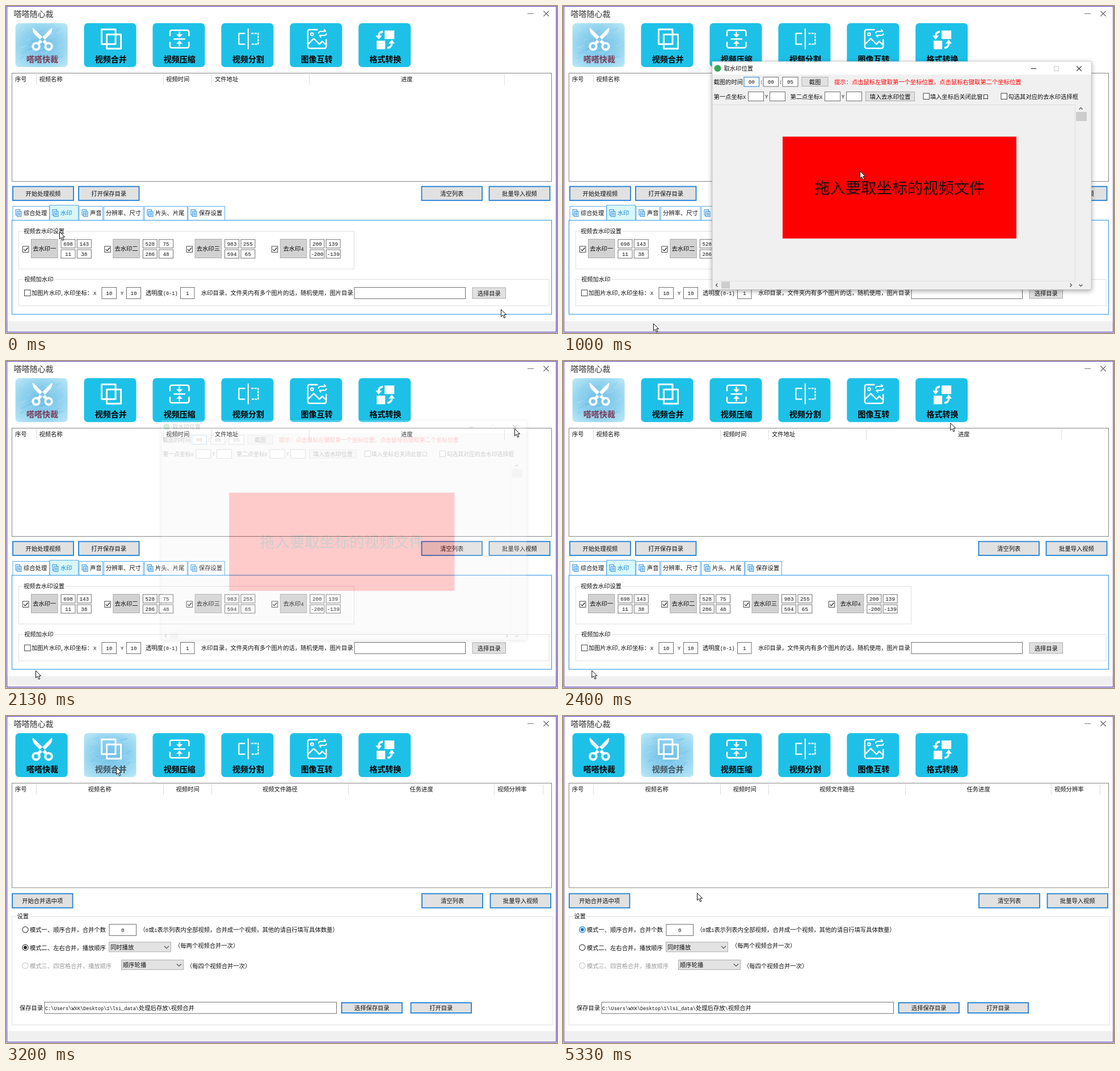
Write an HTML page that moves like this. It is 971 px wide and 577 px high and loops after 5.39 s.

```html
<!DOCTYPE html>
<html lang="zh-CN">
<head>
<meta charset="utf-8">
<title>视频工具</title>
<style>
html, body { margin: 0; width: 100%; height: 100%; overflow: hidden; background: #fff; }
svg { display: block; width: 971px; height: 577px; }
text { font: 10.3px "Noto Sans CJK SC", "Noto Sans CJK JP", "Noto Sans CJK", sans-serif; fill: #111; }
.a { font-family: "Liberation Mono", monospace; font-size: 8.6px; }
.num .a { font-size: 9.3px; }
.thin { font-weight: 300; }
.w { fill: none; stroke: #fff; stroke-width: 3; stroke-linejoin: round; }
.f { fill: #fff; stroke: none; }
</style>
</head>
<body>
<svg id="stage" viewBox="0 0 971 577" xmlns="http://www.w3.org/2000/svg"></svg>
<script>
const LOOP = 5390, STEP = 200 / 3;
const SWITCH = 3060, PICK = 4900;
const APP = '嗒嗒随心裁';
const TILES = ['嗒嗒快裁', '视频合并', '视频压缩', '视频分割', '图像互转', '格式转换'];
const GREY = '#d2d2d2', GREY_EDGE = '#adadad', BLUE_EDGE = '#1f80d4';

// ---- drawing helpers ----
const text = (x, y, s, o = {}) => {
  const runs = s.replace(/[\x21-\x7e]+/g, m => `<tspan class="a">${m}</tspan>`);
  const style = [o.size && `font-size:${o.size}px`, o.bold && 'font-weight:700', o.fill && `fill:${o.fill}`]
    .filter(Boolean).join(';');
  return `<text x="${x}" y="${y}" class="${o.cls || ''}" text-anchor="${o.mid ? 'middle' : 'start'}" style="${style}">${runs}</text>`;
};
// Rectangle from corner to corner
const box = (x1, y1, x2, y2, fill = 'none', stroke = 'none', w = 1, extra = '') =>
  `<rect x="${x1}" y="${y1}" width="${x2 - x1}" height="${y2 - y1}" fill="${fill}" stroke="${stroke}" stroke-width="${w}" ${extra}/>`;
const path = (d, stroke = '#333', w = 1, fill = 'none') =>
  `<path d="${d}" fill="${fill}" stroke="${stroke}" stroke-width="${w}"/>`;
const cross = (x, y, r, c, w = 1, extra = '') =>
  `<path d="M${x - r} ${y - r}l${2 * r} ${2 * r}m0 ${-2 * r}l${-2 * r} ${2 * r}" fill="none" stroke="${c}" stroke-width="${w}" ${extra}/>`;

const blueButton = (x1, y1, x2, y2, s) =>
  box(x1 + 1, y1 + 1, x2 - 1, y2 - 1, '#e1e1e1', BLUE_EDGE, 1.8) +
  text((x1 + x2) / 2, (y1 + y2) / 2 + 4, s, { mid: 1 });
const button = (x1, y1, x2, y2, s, fill = '#e1e1e1', id = '') =>
  box(x1 + .5, y1 + .5, x2 - .5, y2 - .5, fill, GREY_EDGE, 1, id && `id="${id}"`) +
  text((x1 + x2) / 2, (y1 + y2) / 2 + 4, s, { mid: 1 });
const field = (x1, y1, x2, y2, s = '', stroke = '#707070') =>
  box(x1 + .5, y1 + .5, x2 - .5, y2 - .5, '#fff', stroke) +
  text((x1 + x2) / 2, (y1 + y2) / 2 + 3.3, s, { mid: 1, cls: 'num' });
const check = (x, y, on) =>
  box(x + .5, y + .5, x + 11, y + 11, '#fff', '#444') +
  (on ? path(`M${x + 2.5} ${y + 5.8}l2.4 2.6 4.6 -5.4`, '#222', 1.2) : '');
const combo = (x, y, s) =>
  box(x + .5, y + .5, x + 109.5, y + 17.5, '#e3e3e3', GREY_EDGE) +
  text(x + 3, y + 13, s) + path(`M${x + 98} ${y + 7.5}l4 4 4 -4`, '#555', 1.2);
const group = (x1, y1, x2, y2, tx, s) =>
  box(x1, y1, x2, y2, 'none', '#dfdfdf') +
  box(tx - 2, y1 - 3, tx + s.length * 10.3 + 2, y1 + 3, '#fff') + text(tx, y1 + 3.6, s);
const table = (bottom, cols, heads) =>
  box(10.5, 118.5, 961.5, bottom, '#fff', '#858585') +
  cols.map(x => path(`M${x + .5} 120V139`, '#dcdcdc')).join('') +
  heads.map(([x, s]) => text(x, 133, s)).join('');

// ---- toolbar ----
const ICONS = [
  `<circle class="w" cx="36.5" cy="41" r="5.8" style="stroke-width:4"/><circle class="w" cx="58.5" cy="41" r="5.8" style="stroke-width:4"/>
   <path class="f" d="M30 9Q31 8 32 9L52 29 57 35 53 38 45 31 34 20Q30 15 30 9ZM65 9Q64 8 63 9L43 29 38 35 42 38 50 31 61 20Q65 15 65 9Z"/>`,
  `<path class="w" d="M31 11h24.5v26h-24.5zM40 20h25v25h-25z"/>`,
  `<path class="w" style="stroke-width:2.6" d="M30.5 23V16Q30.5 12.5 34 12.5H60Q64 12.5 64 16V23M30.5 33V40Q30.5 43.5 34 43.5H60Q64 43.5 64 40V33M37 28h20.5M47.2 15v7M47.2 41v-7"/>
   <path class="f" d="M41.7 19.5h11l-5.5 6zM41.7 36.5h11l-5.5 -6z"/>`,
  `<path class="w" style="stroke-width:2.2" d="M47.5 9.5V46M42 18H31V37H42"/>
   <path class="w" style="stroke-width:2.2" stroke-dasharray="4 1.5" d="M53 18H65V37H53"/>`,
  `<path class="w" style="stroke-width:2.4" d="M49 11.5H35Q31.5 11.5 31.5 15V41Q31.5 44.5 35 44.5H60.5Q64 44.5 64 41V28M32 37L42 27 52 37 57 32 64 38.5"/>
   <circle class="w" style="stroke-width:2" cx="39" cy="19.5" r="2.4"/>
   <path class="w" style="stroke-width:2" d="M50.5 18Q51 14.5 54 14.5H63M60 11l3.5 3.5M64.5 18Q64 21.5 61 21.5H52M55 25l-3.5 -3.5"/>`,
  `<path class="f" d="M46 13h17v15h-17zM32 31h15v15h-15z"/>
   <path class="w" style="stroke-width:3.4" d="M43 15Q35 16 35.5 24M51 43.5Q59 43 58.5 34"/>
   <path class="f" d="M30 22h11l-5.5 7zM53 36h11l-5.5 -7z"/>`
];
let seed = 7;
const rand = () => (seed = seed * 16807 % 2147483647) / 2147483647;
const brush = () => Array.from({ length: 46 }, () => {
  const x = 8 + rand() * 70, y = 6 + rand() * 62;
  return `<path d="M${x.toFixed(1)} ${y.toFixed(1)}l${(4 + rand() * 9).toFixed(1)} ${(-5 + rand() * 3).toFixed(1)}" stroke="${rand() < .5 ? '#c4e9f8' : '#5ab6e2'}" stroke-width="2" opacity=".22"/>`;
}).join('');
const tile = (i, on) => {
  const ink = on ? (i ? '#45525d' : '#7a3a55') : '#000';
  return `<g transform="translate(${16.6 + 120.93 * i} 30.3)">` +
    box(0, 0, 92, 77.4, on ? 'url(#wash)' : '#1dc1e7', 'none', 1, 'rx="6.5"') +
    (on ? brush() : '') + ICONS[i] +
    text(47.3, 68.5, TILES[i], { size: 14, bold: 1, mid: 1, fill: ink }) + '</g>';
};
const toolbar = sel => TILES.map((_, i) => tile(i, i === sel)).join('');

// ---- first page ----
const docIcon = x => box(x + .5, 359.5, x + 8, 369, '#eaf6ff', '#2b8fdc') +
  path(`M${x + 3} 362.5h7.5v9h-7.5zM${x + 4.5} 365h4.5m-4.5 2h4.5m-4.5 2h4.5`, '#2b8fdc', 1, '#eaf6ff');
const tab = (x1, x2, s, icon, on) =>
  box(x1 + .5, on ? 351.5 : 353.5, x2 + .5, 378, on ? '#d8f8f8' : '#fff', '#58ace9') +
  (icon ? docIcon(x1 + 5) : '') +
  text(x1 + (icon ? 19.5 : 4), 369, s, on ? { fill: '#1b86d6' } : {});
const eraser = (x, name, v, id) =>
  check(x - 15, 423.5, 1) + button(x, 411, x + 47.5, 445, name, GREY, id) +
  v.map((n, i) => {
    const fx = x + 52.5 + i % 2 * 28.3, fy = i < 2 ? 411.5 : 429.5;
    return field(fx, fy, fx + 26, fy + 16, n);
  }).join('');

const pageOne = () => toolbar(0) +
  table(309.5, [53, 277, 362, 534, 878],
    [[16, '序号'], [58.5, '视频名称'], [282, '视频时间'], [368, '文件地址'], [696, '进度']]) +
  blueButton(11, 317.5, 120, 344, '开始处理视频') + blueButton(127, 317.5, 235.5, 344, '打开保存目录') +
  blueButton(731.5, 317.5, 840, 344, '清空列表') + blueButton(850.5, 317.5, 959.5, 344, '批量导入视频') +
  box(10.5, 378, 961.5, 544, '#fff', '#3d9fe6', 1.2) +
  tab(11.5, 76, '综合处理', 1) + tab(128.5, 170, '声音', 1) +
  tab(172, 241.5, '分辨率、尺寸', 0) + tab(243.5, 319, '片头、片尾', 1) +
  tab(320.5, 385, '保存设置', 1) + tab(76.5, 127, '水印', 1, 1) +
  group(22.5, 397.5, 613.5, 464, 31, '视频去水印设置') +
  eraser(44, '去水印一', ['698', '143', '11', '38'], 'hot') +
  eraser(188.3, '去水印二', ['528', '75', '286', '48']) +
  eraser(332.6, '去水印三', ['983', '255', '594', '65']) +
  eraser(482.8, '去水印4', ['200', '139', '-200', '-139']) +
  group(22.5, 482.5, 957, 529, 32, '视频加水印') +
  check(32, 500.5) + text(45, 510, '加图片水印,水印坐标：') + text(154, 510, 'X') +
  field(168.5, 496, 195, 517, '10') + text(202, 510, 'Y') + field(212, 496, 238, 517, '10') +
  text(246, 510, '透明度(0-1)') + field(307, 496, 332.5, 517, '1') +
  text(344, 510, '水印目录，文件夹内有多个图片的话，随机使用，图片目录') +
  field(613.5, 496, 810, 517) + button(821.5, 496.5, 881, 516.5, '选择目录');

// ---- second page ----
const radio = (y, ring, id = '') =>
  `<circle ${id && `id="${id}"`} cx="34" cy="${y}" r="5.2" fill="#fff" stroke="${ring}" stroke-width="1.2"/>`;
const dot = (id, y, c) => `<circle id="${id}" cx="34" cy="${y}" r="2.9" fill="${c}"/>`;

const pageTwo = () => toolbar(1) +
  table(303, [53, 277, 362, 603, 860, 946],
    [[16, '序号'], [144.5, '视频名称'], [299.5, '视频时间'], [452, '视频文件路径'], [711.5, '任务进度'], [866, '视频分辨率']]) +
  blueButton(10, 312.5, 118.5, 339.5, '开始合并选中项') +
  blueButton(732, 312.5, 841, 339.5, '清空列表') + blueButton(852.5, 312.5, 961, 339.5, '批量导入视频') +
  group(10.5, 353.5, 963, 545, 19.5, '设置') +
  radio(377, '#444', 'ring') + dot('dot1', 377, '#0c72c6') +
  text(42, 381, '模式一、顺序合并，合并个数') + field(181.5, 367, 230, 388, '0') +
  text(235.5, 381, '（0或1表示列表内全部视频，合并成一个视频，其他的请自行填写具体数量）') +
  radio(408.5, '#444') + dot('dot2', 408.5, '#222') +
  text(42, 412.5, '模式二、左右合并，播放顺序') + combo(181, 398.5, '同时播放') +
  text(297, 408.5, '（每两个视频合并一次）') +
  radio(440.5, '#ccc') + text(42, 444.5, '模式三、四宫格合并，播放顺序', { fill: '#9a9a9a' }) +
  combo(203, 430, '顺序轮播') + text(318, 444.5, '（每四个视频合并一次）') +
  text(24, 519, '保存目录') + field(67.5, 504.5, 583, 525.5) +
  text(69, 518.5, 'C:\\Users\\WXK\\Desktop\\1\\lsi_data\\处理后存放\\视频合并') +
  blueButton(590.5, 505, 699, 525, '选择保存目录') + blueButton(712.5, 505, 821, 525, '打开目录');

// ---- dialog ----
const chevron = (x, y, turn) =>
  `<path d="M-3 1.5l3 -3 3 3" transform="translate(${x} ${y}) rotate(${turn})" fill="none" stroke="#555" stroke-width="1.4"/>`;
const dialog = () =>
  box(263, 98, 931, 500.5, '#f0f0f0', '#b8b8b8', .8, 'filter="url(#shade)"') +
  box(263.4, 98.4, 930.6, 121, '#fff') +
  '<circle cx="272.5" cy="110" r="6" fill="#35a853"/>' +
  text(283.5, 114, '取水印位置') +
  path('M825 110.5h9', '#222') + box(865.5, 106.5, 873.5, 114.5, 'none', '#ccc') +
  box(888, 98.4, 930.6, 121, '#e81123', 'none', 1, 'id="closeBg"') + cross(909.5, 110.5, 4.2, '#222', 1.1, 'id="closeX"') +
  text(265.5, 138, '截图的时间') + field(318.5, 125, 346, 142.5, '00', BLUE_EDGE) +
  text(347, 137, ':') + field(352.5, 125, 380, 142.5, '00') + text(381, 137, ':') +
  field(386.5, 125, 414.5, 142.5, '05') + button(420.5, 125, 467.5, 142, '截图') +
  text(478, 138, '提示：点击鼠标左键取第一个坐标位置，点击鼠标右键取第二个坐标位置', { fill: '#f00' }) +
  text(265.5, 163.5, '第一点坐标X') + field(326, 151, 354, 168) + text(356, 163, 'Y') + field(364, 151, 392, 168) +
  text(400.5, 163.5, '第二点坐标X') + field(461, 151, 489, 168) + text(491, 163, 'Y') + field(499, 151, 527, 168) +
  button(533, 151, 620, 168, '填入去水印位置') +
  check(634.5, 153.5) + text(647, 163.5, '填入坐标后关闭此窗口') +
  check(771.5, 153.5) + text(784.5, 163.5, '勾选其对应的去水印选择框') +
  path('M264 174.5H902.5V485.5H264', '#dedede') +
  chevron(912.5, 181, 0) + chevron(912.5, 493, 180) + chevron(271, 492.5, -90) + chevron(895, 492.5, 90) +
  box(904, 187, 923, 203, '#cdcdcd') + box(279, 486.5, 294, 498.5, '#cdcdcd') +
  box(387, 230.5, 799, 410.3, '#f00') +
  text(593.3, 330.5, '拖入要取坐标的视频文件', { size: 27.3, mid: 1, cls: 'thin' });

const arrow = id => `<path id="${id}" d="M.5 .5V13.2L3.5 10.4 5.7 15.6 7.9 14.7 5.7 9.7H9.6Z" fill="#fff" stroke="#111" stroke-width="1"/>`;

document.getElementById('stage').innerHTML = `<defs>
  <radialGradient id="wash" r=".66"><stop offset=".1" stop-color="#74c1e8"/><stop offset=".6" stop-color="#93d3ef"/><stop offset="1" stop-color="#b6e6f6"/></radialGradient>
  <filter id="shade" x="-5%" y="-5%" width="110%" height="112%"><feDropShadow dx="0" dy="2" stdDeviation="4" flood-opacity=".35"/></filter>
  </defs>` +
  box(0, 0, 971, 577, '#fff') + box(2, 556, 969, 575, '#f0f0f0') +
  box(1.5, .5, 969.7, 575.5, 'none', '#6a52bd', 1.4) +
  text(13.5, 18.5, APP, { size: 14, fill: '#333' }) +
  path('M919 13.5h11', '#777') + cross(952, 13.5, 4.7, '#555', 1.1) +
  `<g id="one">${pageOne()}</g><g id="two">${pageTwo()}</g><g id="dialog">${dialog()}</g>` +
  arrow('trail') + arrow('pointer');

// ---- motion: [ms, x, y] ----
const POINTER = [[0, 94, 398], [200, 73, 420], [720, 73, 420], [1000, 523, 291], [1200, 600, 262], [1333, 790, 182],
  [1530, 900, 110], [1900, 900, 110], [2000, 896, 119], [2200, 896, 119], [2800, 255, 89], [2930, 205, 89],
  [3200, 194, 90], [3266, 212, 91], [3800, 212, 91], [3933, 127, 222], [4200, 88, 352], [4400, 67, 370],
  [4860, 67, 371], [5333, 236, 312]];
const TRAIL = [[0, 872, 535], [420, 158, 564], [533, 158, 564], [1000, 159, 560], [1200, 150, 556],
  [1333, 134, 554], [2000, 53, 547], [2133, 52, 546], [2800, 48, 545]];

const el = {};
document.querySelectorAll('#stage [id]').forEach(e => el[e.id] = e);
const clamp = v => Math.max(0, Math.min(1, v));
const show = (e, on) => e.setAttribute('display', on ? 'inline' : 'none');

function place(e, keys, t) {
  const k = keys.findIndex(p => p[0] > t);
  const b = keys[k < 0 ? keys.length - 1 : k], a = k > 0 ? keys[k - 1] : b;
  const u = a === b ? 0 : (t - a[0]) / (b[0] - a[0]);
  e.setAttribute('transform', `translate(${a[1] + (b[1] - a[1]) * u} ${a[2] + (b[2] - a[2]) * u})`);
}

function draw(ms) {
  const t = Math.floor((ms % LOOP + 4) / STEP) * STEP;
  const second = t >= SWITCH;
  show(el.one, !second);
  show(el.two, second);
  show(el.trail, !second);
  place(el.pointer, POINTER, t);
  place(el.trail, TRAIL, t);

  const hover = t > 120 && t < 760;
  el.hot.setAttribute('fill', hover ? '#c4e0f5' : GREY);
  el.hot.setAttribute('stroke', hover ? BLUE_EDGE : GREY_EDGE);

  const opened = 1 - (1 - clamp((t - 440) / 200)) ** 2;
  const kept = clamp((2160 - t) / 130);
  const scale = 1 - .0515 * (1 - opened) - .0455 * (1 - kept);
  show(el.dialog, opened * kept > 0);
  el.dialog.setAttribute('opacity', opened * kept);
  el.dialog.setAttribute('transform', `translate(560 281) scale(${scale}) translate(-560 -281)`);
  const closing = t > 1480 && t < 2040;
  show(el.closeBg, closing);
  el.closeX.setAttribute('stroke', closing ? '#fff' : '#222');

  el.ring.setAttribute('stroke', t > 4640 ? '#0c78d0' : '#444');
  show(el.dot1, second && t >= PICK);
  show(el.dot2, second && t < PICK);
}

const start = performance.now();
function tick() {
  draw(performance.now() - start);
  requestAnimationFrame(tick);
}
draw(0);
requestAnimationFrame(tick);
</script>
</body>
</html>
```
